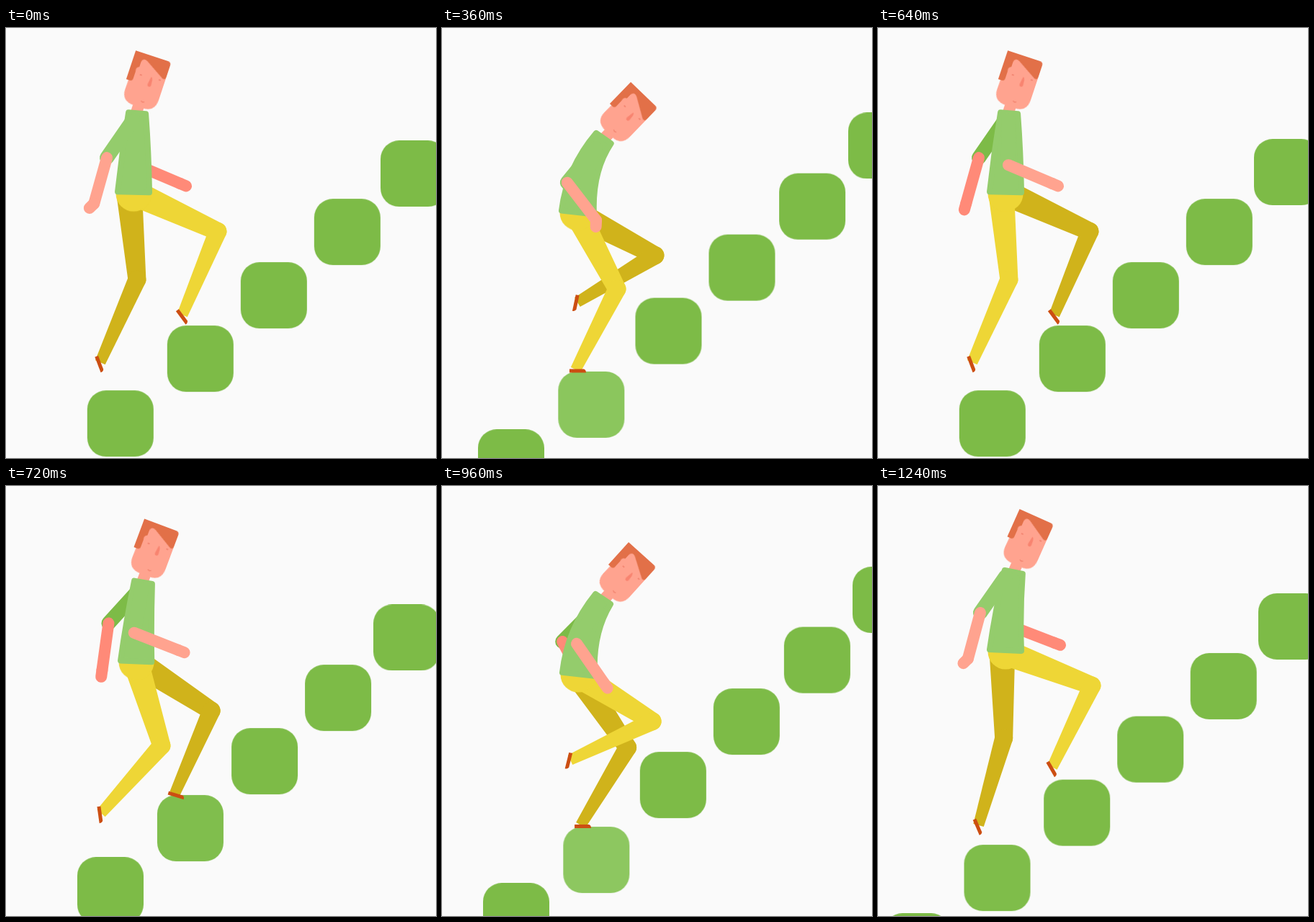
Animation of 597 by 597 pixels, one loop 1.28 s. Source, as an HTML page without scripts:

```html
<!DOCTYPE html>
<html lang="en">
<head>
<meta charset="utf-8">
<title>Climbing steps</title>
<style>
  @property --kx { syntax: "<length>"; inherits: true; initial-value: 0px; }
  @property --ky { syntax: "<length>"; inherits: true; initial-value: 0px; }
  @property --thigh { syntax: "<angle>"; inherits: true; initial-value: 0deg; }
  @property --shin { syntax: "<angle>"; inherits: true; initial-value: 0deg; }
  @property --foot { syntax: "<angle>"; inherits: true; initial-value: 0deg; }
  @property --ex { syntax: "<length>"; inherits: true; initial-value: 0px; }
  @property --ey { syntax: "<length>"; inherits: true; initial-value: 0px; }
  @property --upper { syntax: "<angle>"; inherits: true; initial-value: 0deg; }
  @property --fore { syntax: "<angle>"; inherits: true; initial-value: 0deg; }
  @property --hand { syntax: "<angle>"; inherits: true; initial-value: 0deg; }

  html, body { margin: 0; width: 100%; height: 100%; overflow: hidden; background: #fafafa; }
  svg { display: block; width: 100vw; height: 100vh; }

  /* Steps */
  .step { fill: #7dbb47; animation: slide 640ms linear infinite; }
  .pressed { animation-name: press; }
  .fourth { animation: slide-pair 1280ms linear infinite; }
  @keyframes slide {
    from { transform: translate(var(--from)); }
    to { transform: translate(var(--to)); }
  }
  @keyframes slide-pair {
    0% { transform: translate(520px, 156px); }
    50% { transform: translate(428px, 237px); }
    50.01% { transform: translate(522px, 154px); }
    100% { transform: translate(428px, 237px); }
  }
  @keyframes press {
    0% { transform: translate(224px, 413px); }
    9.38% { transform: translate(213.6px, 421.5px); fill: #7dbb47; }
    15.63% { transform: translate(206.6px, 436px); }
    31.25% { transform: translate(189px, 460px); fill: #94cc6c; }
    50% { transform: translate(168.5px, 473px); }
    68.75% { transform: translate(147.5px, 484.5px); fill: #86c355; }
    75% { transform: translate(140.5px, 487.5px); }
    93.75% { transform: translate(119.7px, 498px); }
    100% { transform: translate(113px, 503px); fill: #7dbb47; }
  }

  /* Body */
  .torso { fill: #94cc6c; stroke: #94cc6c; stroke-width: 8; stroke-linejoin: round; animation: bend 640ms linear infinite; }
  .head { animation: nod 640ms linear infinite; }
  .pelvis { fill: #eed636; animation: bob 640ms linear infinite; }
  @keyframes bend {
    0%, 100% { d: path("M170 117L194 119Q198 172 199 228L155 227Q161 172 170 117Z"); }
    15.63% { d: path("M180 135L205 140Q202 193 203 248L160 246Q168 191 180 135Z"); }
    31.25% { d: path("M194 158L219 166Q210 212 209 270L166 267Q178 211 194 158Z"); }
    50% { d: path("M213 150L234 164Q209 205 212 264L167 259Q174 198 213 150Z"); }
    68.75% { d: path("M216 138L236 153Q207 190 209 248L164 243Q172 186 216 138Z"); }
    75% { d: path("M209 131L229 145Q207 186 204 243L161 238Q173 180 209 131Z"); }
    93.75% { d: path("M176 117L201 122Q197 175 199 229L155 227Q163 172 176 117Z"); }
  }
  @keyframes nod {
    0%, 100% { transform: translate(180px, 31px) rotate(18.4deg); }
    15.63% { transform: translate(195px, 49px) rotate(21deg); }
    31.25% { transform: translate(220px, 75px) rotate(26deg); }
    50% { transform: translate(259px, 78px) rotate(42deg); }
    68.75% { transform: translate(268px, 69px) rotate(48deg); }
    75% { transform: translate(258px, 59px) rotate(45.5deg); }
    93.75% { transform: translate(197px, 32px) rotate(24.2deg); }
  }
  @keyframes bob {
    0%, 93.75%, 100% { transform: translate(177px, 230px); }
    15.63% { transform: translate(182px, 248px); }
    31.25% { transform: translate(188px, 271px); }
    50% { transform: translate(189px, 262px); }
    68.75% { transform: translate(186px, 246px); }
    75% { transform: translate(183px, 241px); }
  }

  /* Limbs: the far pair runs half a cycle ahead */
  .leg { fill: #eed636; transform: translate(var(--kx), var(--ky)); animation: walk 1280ms linear infinite; }
  .arm { --sleeve: #94cc6c; stroke: #ffa38f; stroke-width: 16; stroke-linecap: round;
    transform: translate(var(--ex), var(--ey)); animation: swing 1280ms linear infinite; }
  .leg.far { fill: #d0b31b; animation-delay: -640ms; }
  .arm.far { --sleeve: #7dbb47; stroke: #ff8a78; animation-delay: -640ms; }
  .thigh { transform: rotate(var(--thigh)); }
  .shin { transform: rotate(var(--shin)); }
  .foot { fill: #cc4e12; transform: translateY(125px) rotate(calc(var(--foot) - var(--shin))); }
  .sleeve { stroke: var(--sleeve); stroke-width: 20; transform: rotate(var(--upper)); }
  .forearm { transform: rotate(var(--fore)); }
  .hand { transform: translateY(66px) rotate(var(--hand)); }
  .far .hand { transform: translateY(66px); }

  @keyframes walk {
    0%, 100% { --kx: 294px; --ky: 282px; --thigh: -65.4deg; --shin: 22.9deg; --foot: 54deg; }
    7.81% { --kx: 283px; --ky: 319px; --thigh: -55deg; --shin: 24deg; --foot: 8deg; }
    15.63% { --kx: 280.5px; --ky: 351px; --thigh: -48deg; --shin: 31.4deg; --foot: 0deg; }
    25% { --kx: 258px; --ky: 363px; --thigh: -34.3deg; --shin: 31.2deg; --foot: 0deg; }
    34.38% { --kx: 214px; --ky: 361px; --thigh: -15deg; --shin: 19.3deg; --foot: 0deg; }
    37.5% { --kx: 189px; --ky: 360px; --thigh: -4.5deg; --shin: 10.5deg; --foot: 0deg; }
    46.88% { --kx: 174.5px; --ky: 350px; --thigh: -1deg; --shin: 16deg; --foot: 66.8deg; }
    50% { --kx: 181.5px; --ky: 349px; --thigh: -5deg; --shin: 23.7deg; --foot: 69deg; }
    57.81% { --kx: 224px; --ky: 363px; --thigh: -20deg; --shin: 46deg; --foot: 85deg; }
    65.63% { --kx: 259px; --ky: 371px; --thigh: -37deg; --shin: 67.2deg; --foot: 100deg; }
    75% { --kx: 292px; --ky: 327px; --thigh: -58deg; --shin: 65deg; --foot: 104deg; }
    84.38% { --kx: 303.5px; --ky: 294px; --thigh: -70deg; --shin: 47.5deg; --foot: 98deg; }
    87.5% { --kx: 302px; --ky: 281px; --thigh: -72.3deg; --shin: 40.4deg; --foot: 88deg; }
    96.88% { --kx: 297px; --ky: 277px; --thigh: -69deg; --shin: 26deg; --foot: 60deg; }
  }
  @keyframes swing {
    0%, 100% { --ex: 140px; --ey: 180px; --upper: 34.6deg; --fore: 15.7deg; --hand: 30deg; }
    7.81% { --ex: 143px; --ey: 193px; --upper: 44deg; --fore: 6deg; --hand: 34deg; }
    15.63% { --ex: 149px; --ey: 209px; --upper: 53deg; --fore: -4.5deg; --hand: 38deg; }
    25% { --ex: 167px; --ey: 216px; --upper: 45deg; --fore: -28deg; --hand: 40deg; }
    34.38% { --ex: 187px; --ey: 212px; --upper: 28deg; --fore: -56deg; --hand: 41deg; }
    37.5% { --ex: 190px; --ey: 206px; --upper: 23deg; --fore: -61deg; --hand: 41deg; }
    46.88% { --ex: 183px; --ey: 194px; --upper: 2deg; --fore: -69deg; --hand: 10deg; }
    50% { --ex: 181px; --ey: 190px; --upper: 0deg; --fore: -67deg; --hand: 0deg; }
    57.81% { --ex: 177px; --ey: 207px; --upper: 12deg; --fore: -69deg; --hand: 0deg; }
    65.63% { --ex: 176px; --ey: 221px; --upper: 25deg; --fore: -68.5deg; --hand: 0deg; }
    75% { --ex: 187px; --ey: 219px; --upper: 28deg; --fore: -35deg; --hand: 0deg; }
    84.38% { --ex: 188px; --ey: 203px; --upper: 28deg; --fore: 5deg; --hand: 0deg; }
    87.5% { --ex: 171px; --ey: 191px; --upper: 37deg; --fore: 7deg; --hand: 5deg; }
    96.88% { --ex: 142px; --ey: 176px; --upper: 35deg; --fore: 15deg; --hand: 30deg; }
  }
</style>
</head>
<body>
<svg viewBox="0 0 597 597">
  <defs>
    <rect id="block" width="92" height="92" rx="26"/>
    <g id="leg-parts">
      <path class="thigh" d="M-12.5 0A12.5 12.5 0 0 0 12.5 0L18-122H-18Z"/>
      <g class="shin">
        <path d="M-12.5 0A12.5 12.5 0 0 1 12.5 0L7.5 126H-7.5Z"/>
        <path class="foot" d="M-9 0H11Q14 1 14 5H-9Z"/>
      </g>
    </g>
    <g id="arm-parts">
      <path class="sleeve" d="M0 0V-62"/>
      <g class="forearm">
        <path d="M0 0V66"/>
        <path class="hand" d="M0 0V9"/>
      </g>
    </g>
  </defs>

  <use href="#block" class="step" style="--from: 113px, 503px; --to: 1px, 599px"/>
  <use href="#block" class="step pressed"/>
  <use href="#block" class="step" style="--from: 326px, 325px; --to: 224px, 413px"/>
  <use href="#block" class="step" style="--from: 428px, 237px; --to: 326px, 325px"/>
  <use href="#block" class="step fourth"/>
  <use href="#block" class="step" style="--from: 618px, 70px; --to: 522px, 154px"/>

  <g class="arm far">
    <path class="sleeve" d="M0 0V-62"/>
    <g class="forearm">
      <path d="M0 0V66"/>
      <path class="hand" d="M0 0V9"/>
    </g>
  </g>
  <use href="#leg-parts" class="leg far"/>
  <use href="#leg-parts" class="leg"/>
  <circle class="pelvis" r="24.5"/>

  <g class="head">
    <path fill="#ffa38f" d="M20 66H36V86H20ZM4 5H52V55Q52 73 34 73H22Q3 73 3 56Z"/>
    <path fill="#e27048" d="M0 0H47Q52 0 52 5V21Q52 27 47 25L20 9Q13 6 12 13V20Q7 22 9 28V38Q9 42 5 42H0Z"/>
    <path fill="#f88470" d="M32 28Q35 28 35.5 39Q35.5 42 33 42Q30 42 30.5 38Z"/>
    <path fill="none" stroke="#f0806c" stroke-width="1.3" d="M16 30h3M43 28.500h3M29 64q2.500 2 5 0"/>
  </g>
  <path class="torso" d="M170 117L194 119Q198 172 199 228L155 227Q161 172 170 117Z"/>
  <use href="#arm-parts" class="arm"/>
</svg>
</body>
</html>
```
